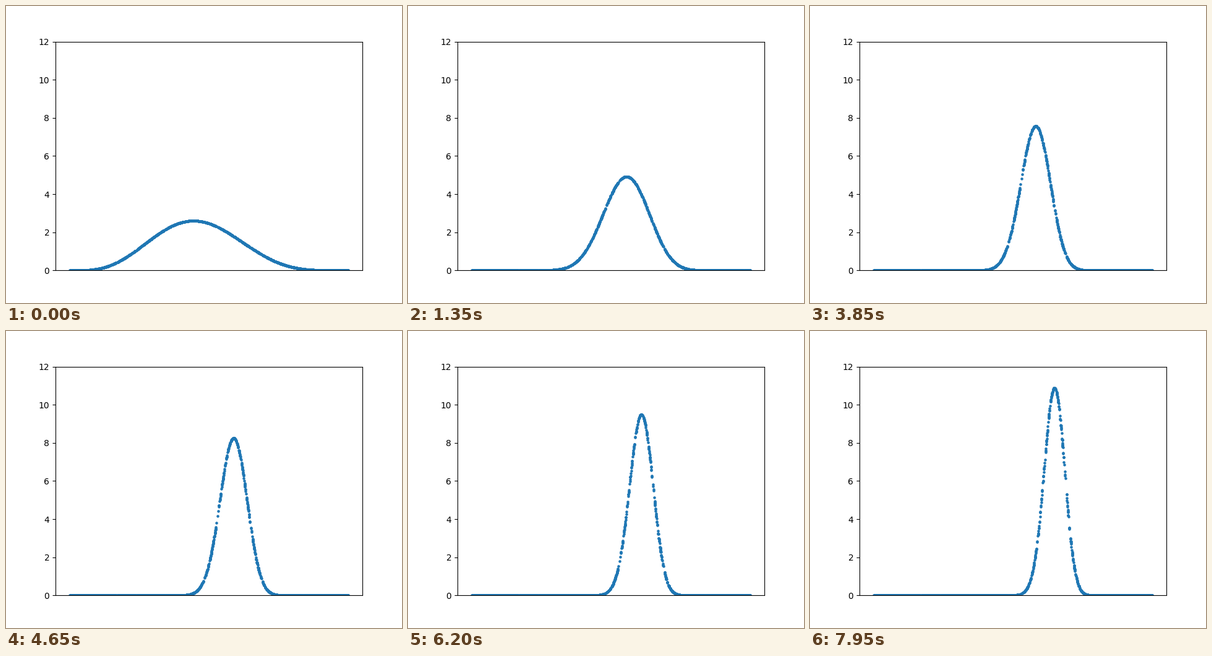
Animation of 640 by 480 pixels, one loop 8.05 s. Source, as a matplotlib script:

```python
"""A coin's bias, inferred flip by flip: the beta posterior sharpens."""
from math import lgamma

import matplotlib.pyplot as plt
import numpy as np
from matplotlib.animation import FuncAnimation

FRAMES, INTERVAL = 161, 50
LAST_FLIP = 159     # the final curve is held for one extra tick
PRIOR_FLIPS = 9

# heads arrive at an even pace between these key flips
KEY_FLIPS = [0, 27, 50, 77, 136, LAST_FLIP]
KEY_HEADS = [4, 20, 31, 50, 89, 109]


def posterior(p, flips):
    """Beta density of the bias after the given number of flips."""
    heads = int(np.interp(flips, KEY_FLIPS, KEY_HEADS))
    tails = PRIOR_FLIPS + flips - heads
    log_norm = lgamma(heads + tails + 2) - lgamma(heads + 1) - lgamma(tails + 1)
    return np.exp(log_norm + heads * np.log(p) + tails * np.log1p(-p))


bias = np.random.default_rng(7).uniform(size=1500)

fig, ax = plt.subplots(figsize=(6.4, 4.8), dpi=100)
ax.set_xlim(-0.05, 1.05)
ax.set_ylim(0, 12)
ax.set_xticks([])
dots = ax.scatter(bias, posterior(bias, 0), s=5, color="C0")


def update(i):
    density = posterior(bias, min(i, LAST_FLIP))
    dots.set_offsets(np.column_stack([bias, density]))
    return (dots,)


anim = FuncAnimation(fig, update, frames=FRAMES, interval=INTERVAL,
                     repeat=True, repeat_delay=0)
plt.show()
```
